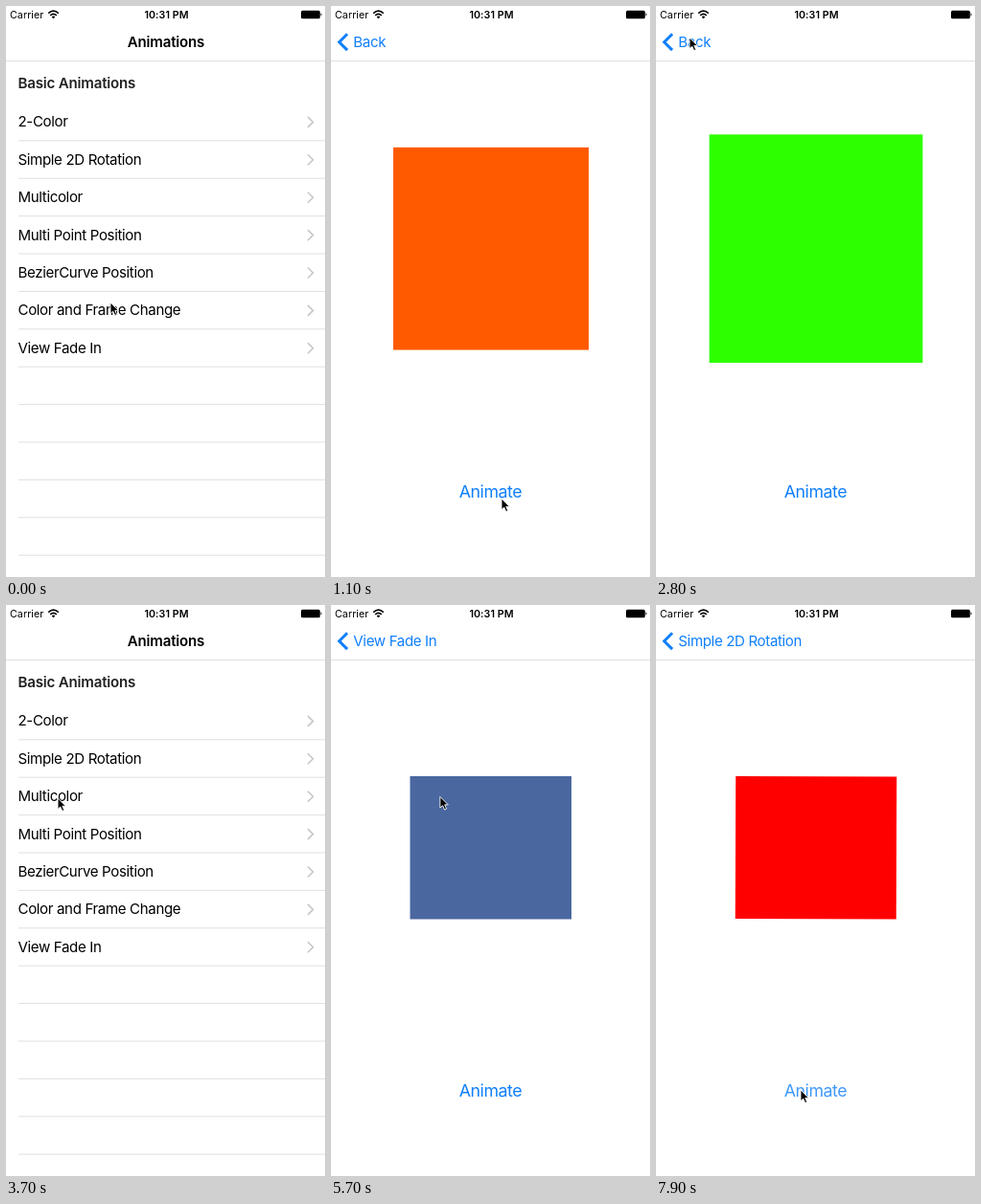
An HTML page that plays this animation: 333 by 597 pixels, repeating every 8000 ms.

```html
<!DOCTYPE html>
<html lang="en">
<head>
<meta charset="utf-8">
<title>Animations</title>
<style>
  html, body { margin: 0; width: 100%; height: 100%; overflow: hidden; background: #fff; }
  svg { display: block; width: 100vw; height: 100vh; }
  text { font: 15.1px Inter, "Open Sans", sans-serif; letter-spacing: -.37px; fill: #000; }
  .strong { font-weight: 600; letter-spacing: -.2px; }
  .status { font-size: 10.7px; letter-spacing: .05px; }
  .blue { fill: #0f7ffb; }
  .button { font-size: 17.8px; letter-spacing: -.45px; }
  .mid { text-anchor: middle; }
  .line { stroke: #e0e0e3; }
  .more { fill: none; stroke: #c7c7cc; stroke-width: 1.6; }
</style>
</head>
<body>
<svg viewBox="0 0 333 597">
  <rect width="333" height="597" fill="#fff"/>
  <g id="list">
    <rect id="tapped" width="333" height="39.4" fill="#d9d9d9"/>
    <text class="strong" x="12.5" y="85.5" fill-opacity=".87">Basic Animations</text>
    <g id="rows"></g>
  </g>
  <g id="detail">
    <rect width="333" height="597" fill="#fff"/>
    <rect id="box"/>
    <circle id="disc" cx="167" cy="253" r="61" fill="#44c155"/>
    <rect id="panel" x="82.5" y="179" width="168.5" height="149.5" fill="#4a67a0"/>
    <text id="animate" class="blue button mid" x="166.5" y="514">Animate</text>
  </g>
  <rect width="333" height="57" fill="#fff"/>
  <path class="line" d="M0 57.5H333"/>
  <text id="title" class="strong mid" y="43">Animations</text>
  <path id="arrow" d="M17 29.3L8.6 37.7L17 46.1" fill="none" stroke="#0f7ffb" stroke-width="3"/>
  <text id="back" class="blue" y="43"></text>
  <text class="status" x="4" y="13">Carrier</text>
  <path d="M44.2 7.6Q49.5 2.8 54.8 7.6M46.2 9.8Q49.5 6.8 52.8 9.8" fill="none" stroke="#000" stroke-width="1.6"/>
  <path d="M47.7 11.4Q49.5 9.8 51.3 11.4L49.5 13.2Z"/>
  <text class="status strong mid" x="167.5" y="13">10:31 PM</text>
  <rect x="308" y="4.7" width="19.8" height="8.6" rx="1.5"/>
  <path d="M328.5 7.3Q330.6 9 328.5 10.8Z"/>
  <path id="cursor" d="M0 0V11.6L2.7 9.2L4.7 13.6L6.7 12.7L4.8 8.4H8.4Z" stroke="#fff" stroke-width=".9"/>
</svg>
<script>
const LOOP = 8000, STEP = 100;
const ROW_TOP = 101.4, ROW_H = 39.4, CX = 167, CY = 253.7;
const names = ["2-Color", "Simple 2D Rotation", "Multicolor", "Multi Point Position",
  "BezierCurve Position", "Color and Frame Change", "View Fade In"];

// Each visit: the row is picked, the button tapped, then the back link.
const scenes = [
  { kind: "color", row: 5, label: "Back", open: 0, tap: 600, close: 3200, pick: [109, 310], aim: [178, 515] },
  { kind: "fade", row: 6, label: names[6], open: 4400, tap: 5000, close: 5950, pick: [117, 356], aim: [162, 511] },
  { kind: "rotate", row: 1, label: names[1], open: 6900, tap: 7800, close: LOOP, pick: [100, 157], aim: [151, 507] }
];
const backLink = [35, 33];

const el = id => document.getElementById(id);
const ramp = (t, from, span) => Math.min(1, Math.max(0, (t - from) / span));
const smooth = k => k * k * (3 - 2 * k);
const mix = (a, b, k) => a + (b - a) * k;

function set(id, attrs) {
  for (const key in attrs) el(id).setAttribute(key, attrs[key]);
}

el("rows").innerHTML = Array.from({ length: 12 }, (_, i) => {
  const top = ROW_TOP + i * ROW_H;
  const mid = top + 20;
  const label = names[i]
    ? `<text x="12.5" y="${mid + 5}">${names[i]}</text>
       <path class="more" d="M315 ${mid - 5.5}l5.5 5.5l-5.5 5.5"/>` : "";
  return `${label}<path class="line" d="M13 ${top + ROW_H}H333"/>`;
}).join("");

// The hand bends its way: sideways motion lags behind vertical motion.
const sweep = (a, b, k) => [mix(a[0], b[0], k ** 1.8), mix(a[1], b[1], k ** .8)];

function cursorAt(t, scene, next) {
  const leave = scene.close - (scene.kind === "color" ? 1250 : 600);
  if (next && t > scene.close) {
    const from = scene.close + 100;
    return sweep(backLink, next.pick, ramp(t, from, next.open - 200 - from));
  }
  if (next && t > leave) return sweep(scene.aim, backLink, ramp(t, leave, 600));
  const k = smooth(ramp(t, scene.open + 100, 350));
  return scene.pick.map((v, i) => mix(v, scene.aim[i], k));
}

// Growth rises steadily, then sways below its full size.
function growth(t) {
  const rise = ramp(t, 500, 1050);
  const sway = 5 / 6 + Math.cos((t - 2530) / 1260 * 2 * Math.PI) / 6;
  return Math.min(rise, sway);
}

function render(t) {
  const index = scenes.findLastIndex(s => t >= s.open);
  const scene = scenes[index], next = scenes[index + 1];
  const { kind, row, label, tap } = scene;
  const open = smooth(ramp(t, scene.open, 400)) - smooth(ramp(t, scene.close, 450));

  set("list", { transform: `translate(${-100 * open})` });
  set("detail", { transform: `translate(${333 * (1 - open)})` });
  set("tapped", { y: ROW_TOP + row * ROW_H, opacity: open });
  set("title", { x: 167 - 110 * open, opacity: 1 - open });
  set("arrow", { opacity: open });
  set("back", { x: 23.3 + 100 * (1 - open), opacity: open });
  el("back").textContent = label;

  const p = kind === "color" ? growth(t) : 0;
  const w = 168 + 63 * p, h = 149 + 101 * p ** .85;
  const hue = Math.min(120, Math.max(0, (p - .5) * 295));
  const angle = kind === "rotate" ? .2 * ramp(t, tap, STEP) : 0;
  set("box", {
    x: CX - w / 2, y: CY - h / 2, width: w, height: h,
    fill: `hsl(${hue} 100% 50%)`,
    transform: `rotate(${angle} ${CX} ${CY})`,
    opacity: kind === "fade" ? 0 : 1
  });

  const shown = kind === "fade" ? 1 : 0;
  const swap = ramp(t, tap - STEP, 400);
  set("disc", { opacity: shown * (1 - swap) });
  set("panel", { opacity: shown * swap });
  set("animate", { opacity: t < tap ? 1 : mix(.3, 1, ramp(t, tap, 140)) });
  set("cursor", { transform: `translate(${cursorAt(t, scene, next)})` });
}

const start = performance.now();
function tick() {
  const t = (performance.now() - start) % LOOP;
  render(Math.floor(t / STEP) * STEP);
  requestAnimationFrame(tick);
}
tick();
</script>
</body>
</html>
```
